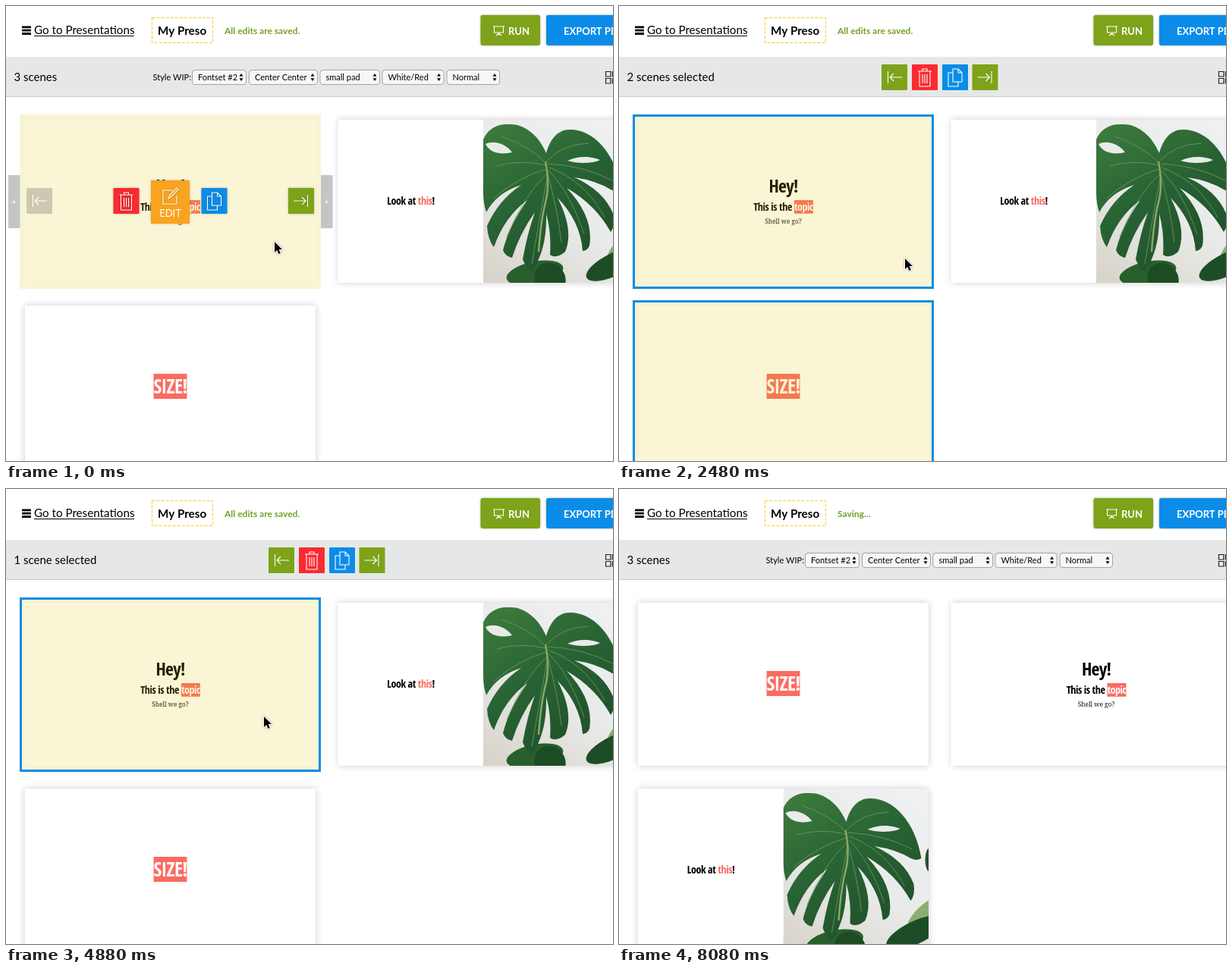
An HTML page with a canvas that plays this animation: 800x600 px, repeating every 8160 ms.

```html
<!DOCTYPE html>
<html lang="en">
<head>
<meta charset="utf-8">
<title>Scene selection</title>
<style>
html, body { margin: 0; width: 100%; height: 100%; overflow: hidden; background: #fff; }
canvas { display: block; }
</style>
</head>
<body>
<canvas id="stage" width="800" height="600"></canvas>
<script>
const ctx = document.getElementById('stage').getContext('2d');
const LOOP = 8160, STEP = 80;
const GREEN = '#7ea31a', BLUE = '#0b8ce8', RED = '#f92a30', CORAL = '#fb6b60', TINT = 'rgba(218,194,0,.165)';
const CARD_W = 383, CARD_H = 215;
const SLOTS = [[25, 150], [437.5, 150], [25, 395]];
const TOOL_X = [346, 386, 426, 465.5];

// time, x, y of the pointer tip
const POINTER = [
  [0, 354, 311], [320, 354, 311], [800, 490, 330], [1200, 490, 330], [1600, 320, 440], [2320, 340, 450],
  [2480, 377, 333], [2880, 365, 93], [3120, 402, 93], [3360, 442, 93], [3600, 483, 93], [3760, 483, 93],
  [4240, 407, 367], [4560, 407, 367], [4800, 340, 300], [4960, 340, 300], [5280, 500, 280], [5440, 500, 280],
  [5680, 471, 130], [5840, 483, 93], [6560, 483, 93], [7040, 500, 450], [7360, 500, 450], [7680, 470, 615]
];
// time, selected slots
const SELECTION = [
  [0, []], [320, [0]], [880, [0, 1]], [1200, [0]], [1840, [0, 2]], [4240, []],
  [4880, [0]], [5360, [0, 1]], [6240, [1, 2]], [7200, []]
];

const ICONS = {
  left: 'M8.5 9v16M11 17h16M16 12l-5 5 5 5',
  right: 'M25.5 9v16M7 17h16M18 12l5 5-5 5',
  trash: 'M8 9h18M14 9V6h6v3M10 9v20h14V9M14 13v12M17 13v12M20 13v12',
  copy: 'M14 6h7l5 5v12H14zM21 6v5h5M14 11H8v18h13v-6',
  edit: 'M29 13H16v18h18V20M23 24l2-5 9-9 2 2-9 9z',
  screen: 'M0 .5h15M1.5 .5v8h12v-8M7.5 8.5v3M4 12.5l3.5-3 3.5 3'
};
const ARROW = new Path2D('M0 0v14l3.2-3 2.2 5 2.4-1-2.2-4.9h4.4z');
const HAND = new Path2D('M-3-8c2-1 3 0 3 2l1 3c1-1 2 0 3 1 1-1 2 0 3 1 2-1 2 1 2 3 0 3-1 4-2 7h-7c-1-3-3-4-5-7-1-2 1-3 3-1z');
const LEAF = new Path2D(`M0 26C6 12 18 5 34 6C52 5 72 18 83 44C88 26 98 12 116 13C146 14 174 44 182 92
  Q176 96 168 92Q148 80 120 76Q160 94 172 126Q174 140 168 148Q148 112 110 90Q146 128 140 166Q137 173 131 173
  Q128 134 98 103Q120 146 108 174Q96 184 88 178Q90 150 83 124Q84 172 64 200Q56 195 52 184Q58 150 68 122
  Q48 150 38 182Q29 180 26 172Q34 140 58 106Q28 128 14 168Q6 158 5 140Q20 106 50 86Q18 96 4 122Q0 110 0 96Z`);
const HOLES = new Path2D('M3 32C15 26 31 33 38 43C26 46 9 45 3 32ZM111 54C127 46 145 49 154 53C144 58 125 58 111 54Z');
const VEINS = new Path2D('M83 58Q64 36 24 22M83 60Q48 52 18 61M83 65Q45 76 13 104M83 72Q54 99 31 154M84 78Q73 135 64 190M85 72Q98 119 103 162M86 67Q114 95 133 151M87 63Q135 81 160 129M85 58Q131 60 170 80M83 55Q104 32 139 31');

const lato = (size, weight = 400) => `${weight} ${size}px Lato, sans-serif`;
const headline = size => `800 condensed ${size}px "Open Sans Condensed", "Roboto Condensed", "Liberation Sans Narrow", "Open Sans", sans-serif`;

function box(x, y, w, h, fill, radius = 0) {
  ctx.fillStyle = fill;
  ctx.beginPath();
  ctx.roundRect(x, y, w, h, radius);
  ctx.fill();
}

function outline(x, y, w, h, color, width = 1, radius = 0) {
  ctx.strokeStyle = color;
  ctx.lineWidth = width;
  ctx.beginPath();
  ctx.roundRect(x, y, w, h, radius);
  ctx.stroke();
}

function shadowed(blur, alpha, draw) {
  ctx.save();
  ctx.shadowBlur = blur;
  ctx.shadowColor = `rgba(0,0,0,${alpha})`;
  draw();
  ctx.restore();
}

function text(string, x, y, font, color = '#000', align = 'left') {
  ctx.font = font;
  ctx.fillStyle = color;
  ctx.textAlign = align;
  ctx.fillText(string, x, y);
}

function at(x, y, draw) {
  ctx.save();
  ctx.translate(x, y);
  draw();
  ctx.restore();
}

function icon(name, x, y, color = '#fff') {
  at(x, y, () => {
    ctx.strokeStyle = color;
    ctx.lineWidth = 1.1;
    ctx.stroke(new Path2D(ICONS[name]));
  });
}

function button(name, x, y, fill, w = 34, h = 34) {
  box(x, y, w, h, fill, 1);
  icon(name, x, y);
}

// Centred, tightly tracked line made of [string, colour, background] runs
function headlineRuns(runs, center, y, size) {
  ctx.save();
  ctx.letterSpacing = `${-.03 * size}px`;
  ctx.font = headline(size);
  const widths = runs.map(run => ctx.measureText(run[0]).width);
  let x = center - widths.reduce((a, b) => a + b) / 2;
  runs.forEach(([string, color, back], i) => {
    if (back) box(x, y - size, widths[i], size * 1.27, back);
    text(string, x, y, headline(size), color);
    x += widths[i];
  });
  ctx.restore();
}

function gradient(x0, y0, x1, y1, ...colors) {
  const g = ctx.createLinearGradient(x0, y0, x1, y1);
  colors.forEach((color, i) => g.addColorStop(i / (colors.length - 1), color));
  return g;
}

function blob(x, y, rx, ry, angle, color) {
  ctx.fillStyle = color;
  ctx.beginPath();
  ctx.ellipse(x, y, rx, ry, angle, 0, 7);
  ctx.fill();
}

function plant() {
  ctx.beginPath();
  ctx.rect(0, 0, 191.5, CARD_H);
  ctx.clip();
  box(0, 0, 192, CARD_H, gradient(150, 0, 10, 215, '#eef0f1', '#e9ebea', '#d8d3c9'));
  blob(184, 166, 28, 10, -.8, '#8bae70');
  blob(174, 190, 42, 15, -.45, '#1d4d27');
  blob(192, 94, 5, 15, 0, '#244f2b');
  blob(68, 202, 38, 15, -.2, '#285f2c');
  blob(88, 210, 20, 22, -.6, '#1d4c24');
  ctx.fillStyle = gradient(20, 10, 135, 180, '#3c793c', '#286334', '#20512b');
  ctx.fill(LEAF);
  ctx.fillStyle = '#e9ebe8';
  ctx.fill(HOLES);
  ctx.strokeStyle = '#6f9d5c';
  ctx.lineWidth = .8;
  ctx.stroke(VEINS);
  ctx.strokeStyle = '#8aa868';
  ctx.lineWidth = 2.5;
  ctx.stroke(new Path2D('M82 55Q88 86 82 109T73 174'));
}

const SCENES = {
  hey() {
    headlineRuns([['Hey!', '#000']], 191.5, 96, 23.5);
    headlineRuns([['This is the ', '#000'], ['topic', '#fff', CORAL]], 191.5, 120, 14);
    text('Shell we go?', 191.5, 137, '8.3px "Noto Serif", serif', '#111', 'center');
  },
  look() {
    headlineRuns([['Look at ', '#000'], ['this', CORAL], ['!', '#000']], 96, 112, 14);
    at(191.5, 0, plant);
  },
  size() {
    headlineRuns([['SIZE!', '#fff', CORAL]], 191.5, 116, 26);
  }
};

function hoverTools() {
  for (const x of [-22, 390]) {
    box(x, 73, 15.5, 70, '#c3c5c4', 1);
    text('+', x + 7.5, 112, lato(12), '#fff', 'center');
  }
  button('left', 2, 90, '#cdc9b0');
  shadowed(3, .25, () => {
    button('trash', 116.5, 90, RED);
    button('copy', 232.5, 90, BLUE);
    button('right', 347, 90, GREEN);
    button('edit', 166, 80, '#faa31e', 51, 57);
  });
  text('EDIT', 191.5, 128, lato(13), '#fff', 'center');
}

function card(scene, selected, hovered, tools) {
  const tinted = selected || hovered;
  shadowed(9, tinted ? .04 : .2, () => box(0, 0, CARD_W, CARD_H, '#fff'));
  scene();
  if (tinted) box(-7, -7, 397, 230, TINT);
  if (selected) outline(-5.5, -5.5, 394, 227, BLUE, 3);
  if (tools) hoverTools();
}

function header(status) {
  for (const y of [26.5, 30.8, 35.1]) box(21, y, 12, 2.8, '#000', .5);
  text('Go to Presentations', 37, 37, lato(15.2));
  box(37, 39, 132, 1, '#000');
  ctx.setLineDash([4, 2]);
  outline(192.5, 15.5, 80, 33, '#f2cf2c');
  ctx.setLineDash([]);
  text('My Preso', 200, 38, lato(15.2, 700));
  text(status, 288, 37, lato(12, 700), '#72a025');
  shadowed(3, .35, () => {
    box(625.5, 12, 78.5, 40, GREEN, 3);
    box(712, 12, 120, 40, BLUE, 3);
  });
  icon('screen', 642, 26.5);
  text('RUN', 662, 38, lato(13, 700), '#fff');
  text('EXPORT PDF', 735, 38, lato(13, 700), '#fff');
}

function select(label, x, w) {
  box(x, 84, w, 20, '#a3a5a4', 4.5);
  box(x + 1, 85, w - 2, 18, '#f6f7f7', 3.5);
  text(label, x + 8, 98, lato(11));
  at(x + w - 7, 94, () => {
    ctx.fillStyle = '#000';
    ctx.fill(new Path2D('M-2.5-1.2h5L0-5zM-2.5 1.2h5L0 5z'));
  });
}

function toolbar(count, hot) {
  box(0, 67, 800, 53, '#e6e8e7');
  box(0, 119, 800, 1, '#cbcdcc');
  for (const x of [790.5, 799.5]) for (const y of [86.5, 95.5]) outline(x, y, 6.5, 6.5, '#222', 1.2);
  const label = count ? `${count} scene${count > 1 ? 's' : ''} selected` : '3 scenes';
  text(label, 10.5, 99, lato(15));
  if (count) {
    ['left', 'trash', 'copy', 'right'].forEach((name, i) =>
      button(name, TOOL_X[i], 77, i === hot ? '#555' : [GREEN, RED, BLUE, GREEN][i]));
  } else {
    text('Style WIP:', 193.5, 98, lato(11));
    select('Fontset #2', 245, 72);
    select('Center Center', 320, 91);
    select('small pad', 413.5, 79.5);
    select('White/Red', 495.5, 82);
    select('Normal', 580.5, 70.5);
  }
}

function pointerAt(t) {
  const next = POINTER.findIndex(key => key[0] > t);
  if (next < 0) return POINTER.at(-1).slice(1);
  const [t0, x0, y0] = POINTER[next - 1], [t1, x1, y1] = POINTER[next];
  const k = (t - t0) / (t1 - t0), e = k * k * (3 - 2 * k);
  return [x0 + (x1 - x0) * e, y0 + (y1 - y0) * e];
}

function pointer(x, y, isHand) {
  at(x, y, () => {
    const shape = isHand ? HAND : ARROW;
    ctx.lineJoin = 'round';
    ctx.lineWidth = isHand ? 1.2 : 2;
    ctx.strokeStyle = isHand ? '#000' : '#fff';
    ctx.fillStyle = isHand ? '#fff' : '#000';
    shadowed(3, .3, () => ctx.stroke(shape));
    ctx.fill(shape);
  });
}

function draw(t) {
  const [px, py] = pointerAt(t);
  const selected = SELECTION.findLast(key => key[0] <= t)[1];
  const order = t < 6240 ? ['hey', 'look', 'size'] : ['size', 'hey', 'look'];
  const inTools = selected.length && py > 77 && py < 111;
  const hot = inTools ? TOOL_X.findIndex(x => px >= x && px < x + 34) : -1;

  box(0, 0, 800, 600, '#fff');
  header(t < 8000 ? 'All edits are saved.' : 'Saving...');
  toolbar(selected.length, hot);
  SLOTS.forEach(([x, y], i) => {
    const hovered = px > x && px < x + CARD_W && py > y && py < y + CARD_H;
    at(x, y, () => card(SCENES[order[i]], selected.includes(i), hovered, hovered && !selected.length));
  });
  pointer(px, py, hot >= 0);
}

function frame(now) {
  draw(Math.floor(now % LOOP / STEP) * STEP);
  requestAnimationFrame(frame);
}
requestAnimationFrame(frame);
</script>
</body>
</html>
```
